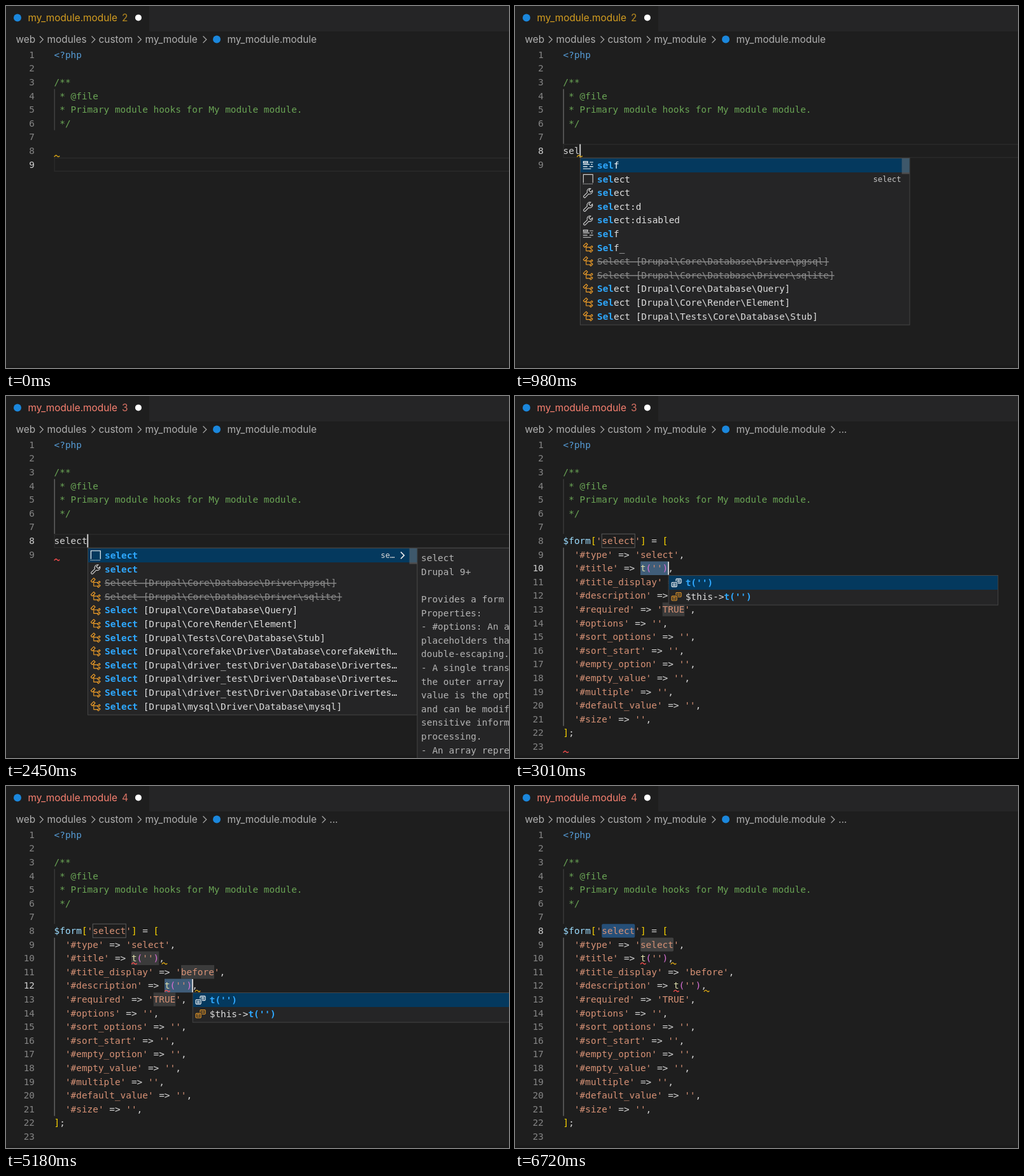
Recreate the animation shown at these times as an HTML page. Size 790 px wide and 570 px high, loop 7140 ms.

```html
<!DOCTYPE html>
<html lang="en">
<head>
<meta charset="utf-8">
<title>Snippet completion</title>
<style>
  html, body { margin: 0; width: 100%; height: 100%; overflow: hidden; background: #1e1e1e; }
  svg { display: block; }
  text { white-space: pre; font: 14.4px 'DejaVu Sans Mono', monospace; font-variant-ligatures: none; }
  .ui { font: 15.4px Inter, 'Open Sans', sans-serif; }
  .small { font-size: 12.2px; }
  .hit { font-weight: bold; fill: #2ea8ff; }
  .old { text-decoration: line-through; }
</style>
</head>
<body>
<svg id="stage" width="790" height="570" viewBox="0 0 790 570"></svg>
<script>
const LOOP = 7140, X0 = 75.6, CW = 8.669, LH = 21.6, TOP = 66;
const WARN = '#d9a514', ERR = '#f14c4c', GREY = '#d4d4d4', EDGE = '#454545';

const colX = c => X0 + CW * c;
const lineY = n => TOP + LH * (n - 1);
const esc = s => s.replace(/&/g, '&amp;').replace(/</g, '&lt;').replace(/>/g, '&gt;');
const span = (s, fill) => `<tspan fill="${fill}">${esc(s)}</tspan>`;
const text = (x, y, body, fill = GREY, more = '') =>
  `<text x="${x}" y="${y}" fill="${fill}" ${more}>${body}</text>`;
const rect = (x, y, w, h, fill, more = '') =>
  `<rect x="${x}" y="${y}" width="${w}" height="${h}" fill="${fill}" ${more}/>`;
const path = (d, stroke, w = 1.2) => `<path d="${d}" fill="none" stroke="${stroke}" stroke-width="${w}"/>`;
const shape = (d, fill) => `<path d="${d}" fill="${fill}" fill-rule="evenodd"/>`;

/* ---- document ---- */
const head = ['<?php', '', '/**', ' * @file',
  ' * Primary module hooks for My module module.', ' */', ''];
const fields = { type: "'select'", title: "t('')", title_display: "'before'", description: "t('')",
  required: "'TRUE'", options: "''", sort_options: "''", sort_start: "''", empty_option: "''",
  empty_value: "''", multiple: "''", default_value: "''", size: "''" };
const form = ["$form['select'] = [",
  ...Object.entries(fields).map(([k, v]) => `  '#${k}' => ${v},`), '];', ''];

function paint(s, n) {
  if (n === 1) return span(s, '#569cd6');
  if (n < 7) return span(s, '#6aa555');
  const fills = ['#d69175', '#9cdcfe', '#ffd700', '#da70d6', '#dcdcaa', GREY];
  return s.replace(/('[^']*')|(\$\w+)|([[\]])|([()])|(t(?=\())|([^'$[\]()t]+|.)/g,
    (m, ...g) => span(m, fills[g.findIndex(v => v !== undefined)]));
}

/* ---- icons, on a 16 unit grid ---- */
const icons = {
  keyword: c => shape('M15 4h-5V3h5zM14 7h-2V6h2zM10 7H1V6h9zM12 13H1v-1h11zM7 10H1V9h6zM15 10h-5V9h5zM8 2v3H1V2zM7 3H2v1h5z', c),
  snippet: c => path('M1.5 13V1.5H14.5V13', c, 1) +
    `<path d="M1 14.5H15" stroke="${c}" stroke-dasharray="1 1"/>`,
  prop: c => path('M14 4.5L11.5 7L9 4.5L11.5 2A4 4 0 0 0 6.8 7.4L1.8 12.4A1.6 1.6 0 0 0 4 14.4L8.8 9.4A4 4 0 0 0 14 4.5Z', c, 1),
  cls: c => shape('M11.3 9.7h.7l2.7-2.7v-.7L13.4 5h-.7l-1.8 1.8h-5V5.6l1.8-1.9V3l-2-2H5L1 5v.7l2 2h.7l1.1-1.1v5.7l.5.5H10v.5l1.3 1.4h.7l2.7-2.7v-.7L13.4 10h-.7l-1.9 1.8h-5v-4H10v.5zM13 6.1l.6.6-2 2-.6-.6zM13 11.1l.6.6-2 2-.6-.6zM3.4 6.6L2.1 5.3l3.2-3.2 1.3 1.2z', c),
  option: c => shape('M14 2H8L7 3v3h1V3h6v5h-4v1h4l1-1V3zM9 6h4v1H9.4L9 6.6zM7 7H2L1 8v5l1 1h6l1-1V8L8 7zM8 13H2V8h6zM3 9h4v1H3zM3 11h4v1H3zM9 4h4v1H9z', c)
};

/* ---- suggestions: [icon, label, deprecated] ---- */
const cls = (p, old) => ['cls', `Select [Drupal/${p}`.replace(/\//g, '\\'), old];
const testDriver = cls('driver_test/Driver/Database/Drivertes…');
const pool = [
  ['keyword', 'self'], ['snippet', 'select'], ['prop', 'select'], ['prop', 'select:d'],
  ['prop', 'select:disabled'], ['keyword', 'self'], ['cls', 'Self_'],
  cls('Core/Database/Driver/pgsql]', true), cls('Core/Database/Driver/sqlite]', true),
  cls('Core/Database/Query]'), cls('Core/Render/Element]'), cls('Tests/Core/Database/Stub]'),
  cls('corefake/Driver/Database/corefakeWith…'), testDriver, testDriver, testDriver,
  cls('mysql/Driver/Database/mysql]')
];
const words = q => pool.filter(([, l]) => l.toLowerCase().startsWith(q) &&
  !(q === 'select' && l.includes(':'))).slice(0, 12);
const options = (...list) => list.map(l => ['option', l]);
const call = options("t('')", "$this->t('')");

const docs = ['select', 'Drupal 9+', '', 'Provides a form element', 'Properties:',
  '- #options: An associative', 'placeholders that sanitize', 'double-escaping.',
  '- A single translated', 'the outer array key is', 'value is the option',
  'and can be modified', 'sensitive information', 'processing.', '- An array representing'];

/* tab stops of the snippet */
const stops = [
  { line: 10, col: 14, word: "t('')", list: call },
  { line: 11, col: 23, word: 'before', list: options('before', 'after', 'invisible', 'attribute') },
  { line: 12, col: 20, word: "t('')", list: call },
  { line: 13, col: 18, word: 'TRUE', list: options('TRUE', 'FALSE') },
  { line: 8, col: 7, word: 'select' }
];

/* ---- timeline: [ms, what changes] ---- */
const steps = [
  [0, { line: 9, typed: '', query: '', caret: false, count: 2, bad: false }],
  [210, { line: 8, caret: true }],
  [630, { typed: 's' }],
  [700, { query: 's' }],
  [770, { typed: 'se' }],
  [840, { query: 'se' }],
  [910, { typed: 'sel' }],
  [980, { query: 'sel' }],
  [1050, { typed: 'sele' }],
  [1120, { query: 'sele', doc: true }],
  [1260, { typed: 'selec', query: 'selec' }],
  [1400, { typed: 'select' }],
  [1470, { query: 'select', doc: false }],
  [1540, { doc: true }],
  [1960, { caret: false, parsed: true }],
  [2100, { count: 3, bad: true }],
  [2450, { caret: true }],
  [2660, { form: true, query: '', doc: false, stop: 0 }],
  [2730, { marked: true }],
  [2800, { menu: true }],
  [3010, { dots: true }],
  [3150, { caret: false }],
  [3360, { checked: true }],
  [3570, { count: 4 }],
  [3710, { caret: true }],
  [4200, { caret: false }],
  [4340, { stop: 1, menu: false, caret: true }],
  [4410, { menu: true }],
  [4830, { caret: false }],
  [5180, { stop: 2, caret: true }],
  [5600, { stop: 3 }],
  [6090, { menu: false, caret: false }],
  [6160, { stop: 4, caret: true }],
  [6230, { same: true }],
  [6720, { caret: false }]
];
let last = {};
const states = steps.map(([, change]) => last = { ...last, ...change });

/* ---- drawing ---- */
const squiggle = (line, col, color) =>
  path(`M${colX(col)} ${lineY(line) + LH - 1.4}l2.4-2.2h1.2l2.4 2.2h1.2l1.4-1.4`, color, 1.4);
const mark = (s, fill, more) =>
  rect(colX(s.col), lineY(s.line), CW * s.word.length, LH, fill, more);
const guide = (from, to, color) =>
  rect(75.6, lineY(from), 1.2, LH * (to - from + 1), color);
const chevron = (x, y = 47.5, c = '#a6a6a6', w = 1.3) => path(`M${x} ${y}l5.3 5.3-5.3 5.3`, c, w);
const ui = (x, y, s, fill) => text(x, y, esc(s), fill, 'class="ui"');

function chrome(s) {
  const hue = s.bad ? '#f88070' : '#d39d20', crumb = '#b0b0b0';
  return rect(0, 0, 790, 570, '#1e1e1e') + rect(225, 0, 565, 40, '#252526') +
    rect(0, 566, 790, 4, '#1a1a1a') +
    '<circle cx="18" cy="18.5" r="6" fill="#1b87dc"/><circle cx="331" cy="52.5" r="6" fill="#1b87dc"/>' +
    ui(34.5, 24.3, 'my_module.module', hue) +
    `<g opacity=".85">${ui(182, 24.3, String(s.count), hue)}</g>` +
    '<circle cx="207.9" cy="18.4" r="5" fill="#fff"/>' +
    [[15.5, 'web'], [64.5, 'modules'], [145.5, 'custom'], [218.5, 'my_module'], [347.5, 'my_module.module']]
      .map(([x, w]) => ui(x, 58, w, crumb)).join('') +
    [53, 134.5, 207, 309.5].map(x => chevron(x)).join('') +
    (s.dots ? chevron(496.5) + ui(508, 58, '...', crumb) : '');
}

function popup(items, query, line, col, doc) {
  const x = colX(col) + .9, y = Math.round(lineY(line + 1)) + .5, w = 517.4, h = items.length * LH + 3.4;
  let out = rect(x, y, w, h, '#252526', `stroke="${EDGE}"`);
  if (doc) out += rect(x + w, y, 400, 400, '#252526', `stroke="${EDGE}"`) +
    docs.map((d, i) => text(x + w + 6.2, y + 20.7 + i * LH, esc(d), '#b4b4b4')).join('');
  out += rect(x + .5, y + .5, w - 1, 22, '#04395e');
  items.forEach(([icon, label, old], i) => {
    const top = y + .7 + i * LH, at = label.toLowerCase().indexOf(query.toLowerCase());
    const orange = icon === 'cls' || icon === 'option' && i > 0;
    const tint = orange ? '#ee9d28' : i ? '#cfcfcf' : '#fff';
    out += `<g transform="translate(${x + 3.2} ${top + 1.8}) scale(1.14)">${icons[icon](tint)}</g>`;
    const end = at + query.length;
    const body = old || at < 0 ? esc(label) : esc(label.slice(0, at)) +
      `<tspan class="hit">${esc(label.slice(at, end))}</tspan>` + esc(label.slice(end));
    out += text(x + 26.5, top + 15.8, body, old ? '#8c8c8c' : i ? '#dedede' : '#fff', old ? 'class="old"' : '');
    if (icon === 'snippet') out += text(x + 460, top + 15.2, doc ? 'se…' : 'select', i ? '#c4c4c4' : '#dcdcdc', 'class="small"') +
      (doc ? chevron(x + 491.5, top + 5.4, '#eee', 1.6) : '');
  });
  if (items.length > 8) out += rect(x + w - 12.4, y + .5, 12, 24.5, '#797979', 'opacity=".5"');
  return out;
}

function draw(s) {
  const stop = s.form && stops[s.stop], line = stop ? stop.line : s.line;
  const lines = head.concat(s.form ? form : [s.typed, '']);
  let out = chrome(s);

  if (s.form) {
    out += guide(4, 7, '#404040') + guide(9, 21, '#707070');
    if (s.marked) {
      if (s.stop < 4) {
        stops.forEach((p, i) => {
          out += i === 4 ? mark(p, 'none', 'stroke="#5a5a5a"') : mark(p, i === s.stop ? '#405d79' : '#3b3b3b');
        });
      } else {
        out += mark(stop, '#264f78', 'rx="2"');
        if (s.same) out += mark({ line: 9, col: 14, word: 'select' }, '#414141', 'rx="2"');
      }
    }
  } else {
    out += s.typed ? guide(4, 7, '#707070') : guide(4, 6, '#4a4a4a');
    out += rect(76.2, lineY(line) + .6, 720, LH - .8, 'none', 'stroke="#2b2b2b" stroke-width="1.4"');
  }

  lines.forEach((l, i) => {
    const y = lineY(i + 1) + 15.8;
    out += text(45, y, i + 1, i + 1 === line ? '#d0d0d0' : '#858585', 'text-anchor="end"');
    if (l) out += text(X0, y, paint(l, i + 1));
  });

  const col = stop ? stop.col + stop.word.length : s.typed.length;
  if (s.caret) out += rect(colX(col) - .2, lineY(line) + .4, 1.8, LH - .8, '#dedede');

  if (!s.parsed) out += squiggle(8, Math.max(0, s.typed.length - .5), WARN);
  else if (!s.checked) out += squiggle(s.form ? 23 : 9, 0, ERR);
  else for (const p of [stops[0], stops[2]])
    out += squiggle(p.line, p.col, ERR) + squiggle(p.line, p.col + 5.5, WARN);

  if (s.query) out += popup(words(s.query), s.query, 8, s.query.length, s.doc);
  if (s.menu) out += popup(stop.list, stop.word, line, col);
  return out;
}

/* ---- playback ---- */
const stage = document.getElementById('stage');
let shown = -1;
function tick() {
  const t = performance.now() % LOOP;
  const i = steps.filter(([ms]) => ms <= t).length - 1;
  if (i !== shown) stage.innerHTML = draw(states[shown = i]);
  requestAnimationFrame(tick);
}
tick();
</script>
</body>
</html>
```
